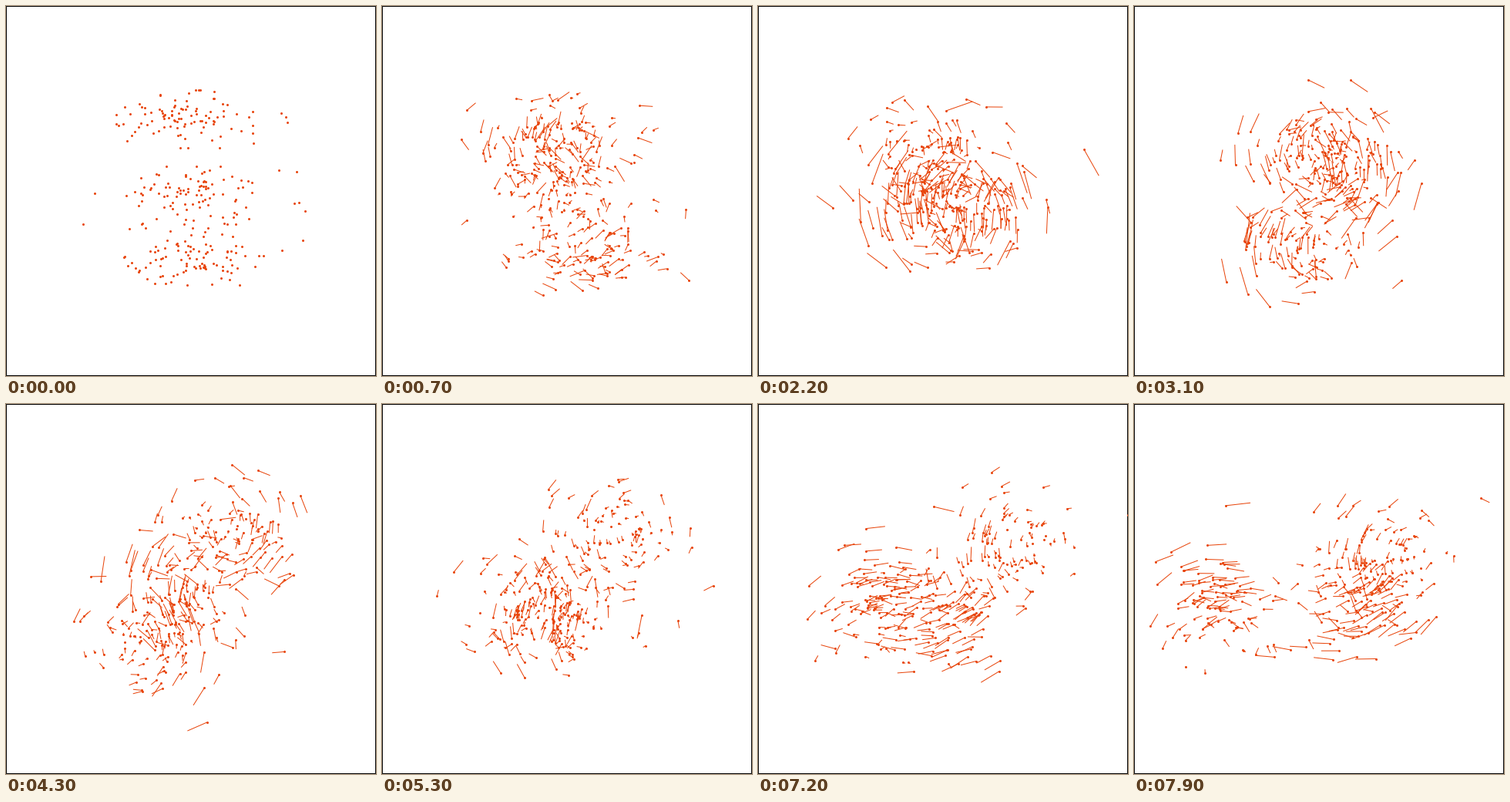
A matplotlib script for the animation above (8 s loop, 480 px wide and 480 px high).

```python
import numpy as np
import matplotlib.pyplot as plt
from matplotlib.animation import FuncAnimation
from matplotlib.collections import LineCollection
from matplotlib.patches import Rectangle

SIZE, DPI = 480, 100
FRAMES, STEP = 80, 100
LAG = 2                       # trail length in steps
COLOR = "#e8440a"
PX = 72 / DPI                 # one pixel in points

# Key offsets of two clusters from the middle; the third balances them
MIDDLE = np.array([241, 239])
KNOTS = np.array([0, 13, 31, 43, 53, 66, 79])
TOP = [(-7, -94), (-20, -44), (-28, 74), (-47, 66), (-40, 22), (-52, 12), (-135, 20)]
LOW = [(2, 88), (43, 68), (34, -27), (58, -72), (57, -66), (80, -64), (78, -34)]
COUNT = 100                   # points per cluster

# Four-dimensional scatter inside each cluster
SPREAD = np.array([45, 17, 33, 33])
LIMIT = np.array([3.2, 2.2, 3, 3])


def spline(points):
    """Return a smooth curve through the points at the knots."""
    p = np.array(points, float)
    m = np.gradient(p, KNOTS, axis=0)

    def at(t):
        i = min(np.searchsorted(KNOTS, t, "right"), len(KNOTS) - 1) - 1
        h = KNOTS[i + 1] - KNOTS[i]
        s = (t - KNOTS[i]) / h
        ease = s * s * (3 - 2 * s)
        return (p[i] + (p[i + 1] - p[i]) * ease
                + h * s * (1 - s) * ((1 - s) * m[i] - s * m[i + 1]))

    return at


rng = np.random.default_rng(5)


def cloud():
    z = np.clip(rng.standard_t(8, (COUNT, 4)), -LIMIT, LIMIT)
    return (z - z.mean(axis=0)) * SPREAD


clouds = [cloud() for _ in range(3)]
top, low = spline(TOP), spline(LOW)


def basis(t):
    """Orthonormal plane that tilts into the hidden pair and turns within it."""
    tilt = 1 - np.exp(-t / 9)
    a, b = 0.9 * tilt, 1.15 * tilt
    turn = 0.12 * t + 0.7 * np.sin(2 * np.pi * (t - 25) / FRAMES)
    c, s = np.cos(turn), np.sin(turn)
    return np.array([[np.cos(a), 0],
                     [0, np.cos(b)],
                     [np.sin(a) * c, -np.sin(b) * s],
                     [np.sin(a) * s, np.sin(b) * c]])


def positions(t):
    a, c = top(t), low(t)
    plane = basis(t)
    return MIDDLE + np.vstack([m + z @ plane for m, z in zip((a, -a - c, c), clouds)])


fig = plt.figure(figsize=(SIZE / DPI, SIZE / DPI), dpi=DPI, facecolor="white")
ax = fig.add_axes([0, 0, 1, 1])
ax.set_xlim(0, SIZE)
ax.set_ylim(SIZE, 0)
ax.axis("off")
ax.add_patch(Rectangle((.5, .5), SIZE - 1, SIZE - 1, fill=False,
                       edgecolor="black", linewidth=PX, snap=False))

trails = LineCollection([], colors=COLOR, linewidths=PX, zorder=2)
ax.add_collection(trails)
dots = ax.scatter(*positions(0).T, s=(3 * PX) ** 2, color=COLOR,
                  linewidths=0, zorder=3)


def update(frame):
    now = positions(frame)
    past = positions(max(0, frame - LAG))
    dots.set_offsets(now)
    trails.set_segments(np.stack([past, now], axis=1) if frame else [])
    return trails, dots


anim = FuncAnimation(fig, update, frames=FRAMES, interval=STEP,
                     repeat=True, repeat_delay=0, blit=False)
plt.show()
```
